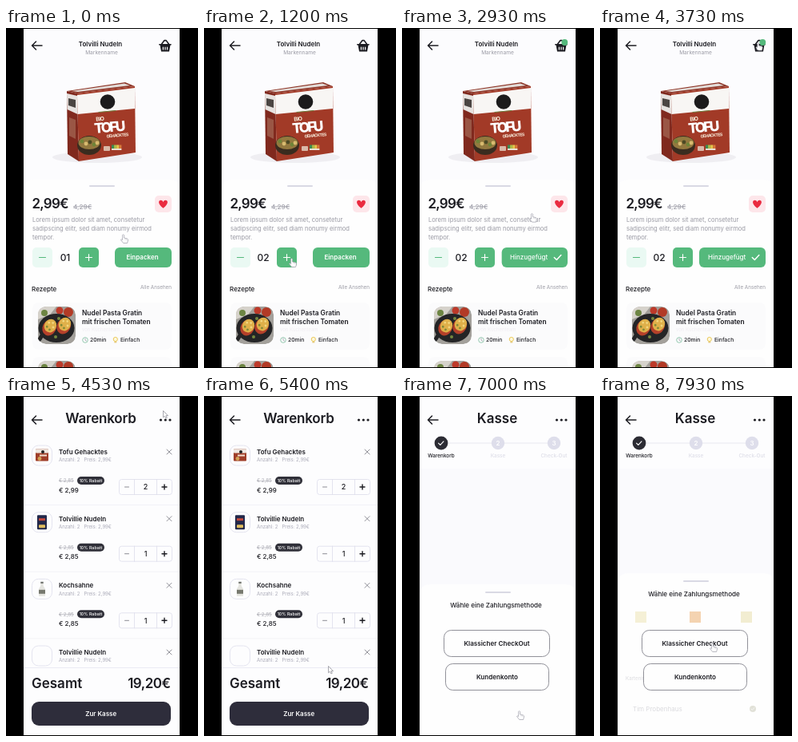
These frames come from a looping animation (240x426 px, 8 s). An HTML page:

```html
<!DOCTYPE html>
<html lang="de">
<head>
<meta charset="utf-8">
<title>Einkauf</title>
<style>
  html, body { margin: 0; width: 100%; height: 100%; overflow: hidden; background: #000; }
  svg { display: block; width: 100vw; height: 100vh; }
  text { font-family: Inter, "Open Sans", sans-serif; white-space: pre; }
</style>
</head>
<body>
<svg id="stage" viewBox="0 0 240 426"></svg>
<script>
const INK = '#1c1c22', GREY = '#9a9aa4', LILAC = '#dedeeb', GREEN = '#55b97c';

const text = (x, y, str, size, weight = 400, fill = INK, more = '') =>
  `<text x="${x}" y="${y}" font-size="${size}" font-weight="${weight}" fill="${fill}" ${more}>${str}</text>`;
const mid = (x, y, str, size, weight, fill, more = '') =>
  text(x, y, str, size, weight, fill, `text-anchor="middle" ${more}`);
const rect = (x, y, w, h, r, fill, more = '') =>
  `<rect x="${x}" y="${y}" width="${w}" height="${h}" rx="${r}" fill="${fill}" ${more}/>`;
const dot = (x, y, r, fill, more = '') => `<circle cx="${x}" cy="${y}" r="${r}" fill="${fill}" ${more}/>`;
const oval = (x, y, rx, ry, fill, more = '') =>
  `<ellipse cx="${x}" cy="${y}" rx="${rx}" ry="${ry}" fill="${fill}" ${more}/>`;
const line = (d, stroke = INK, w = 1, more = '') =>
  `<path d="${d}" fill="none" stroke="${stroke}" stroke-width="${w}" stroke-linecap="round" stroke-linejoin="round" ${more}/>`;
const shape = (d, fill, more = '') => `<path d="${d}" fill="${fill}" ${more}/>`;
const group = (id, content, more = '') => `<g id="${id}" ${more}>${content}</g>`;
const at = (x, y, content) => `<g transform="translate(${x} ${y})">${content}</g>`;

const page = fill => rect(22, 1, 195, 424, 0, fill);
const backArrow = y => line(`M45 ${y}H32.5M37.5 ${y - 5}L32.5 ${y}L37.5 ${y + 5}`, INK, 1.5);
const more = [193.5, 199.3, 205].map(x => dot(x, 30, 1.6, INK)).join('');
const check = (x, y, color, s = 1) =>
  line(`M${x - 4 * s} ${y}l${3 * s} ${3 * s}l${5.5 * s} ${-6 * s}`, color, 1.5 * s);
const handle = y => rect(104, y - 1, 32, 2, 1, '#d9d9e4');
const sheet = y => shape(`M22 446V${y + 14}Q22 ${y} 36 ${y}H204Q218 ${y} 218 ${y + 14}V446Z`, '#fefefe');

function packshot() {
  return oval(114, 162, 56, 7, '#e4e1e8', 'opacity=".5"')
    + shape('M76 79L149 68L161 73L89 82Z', '#8d3527')
    + shape('M82 79L148 69.5L155 72L90 80Z', '#e3dcd8')
    + shape('M76 79L89 82L91 167L77 158Z', '#80291e')
    + shape('M76 82L89 85L89.5 108L76.5 102Z', '#e6e2df')
    + shape('M78 88l9 2v10l-9 -3Z', '#4b4542')
    + shape('M79 112l8 3v24l-8 -4Z', '#9a5645')
    + shape('M89 82L161 73L162 156L91 167Z', '#a23a27')
    + shape('M89 84L161 75V101L89.5 108Z', '#f8f6f4')
    + dot(127, 92.5, 9.3, '#1c1b1c')
    + line('M116 105.5L137 103.5', '#6d7d3c', 1)
    + `<g transform="rotate(-5 127 123)">`
    + text(113, 115.5, 'BIO', 7, 700, '#f6ead9', 'letter-spacing="-.6"')
    + text(110, 130.5, 'TOFU', 17.5, 800, '#fff', 'letter-spacing="-2.8"')
    + text(124.5, 137.5, 'GEHACKTES', 5.4, 700, '#f6ead9', 'letter-spacing="-.7"') + '</g>'
    + oval(104, 147, 15, 12, '#3a2c1f') + oval(104, 144, 13.5, 8, '#93793f')
    + [95, 100, 105, 110, 114].map((x, i) =>
        dot(x, 142 + i * 3 % 5, 2.4, ['#6f8438', '#d8bb70', '#4c4a25'][i % 3])).join('')
    + rect(122, 148, 8, 6, 1, '#d9b8a8')
    + ['#3f8b52', '#a9bd49', '#e4c84c', '#d87838'].map((c, i) => rect(132 + i * 3.1, 146.5, 3.1, 4.5, 0, c)).join('')
    + rect(132, 151, 12.4, 2, 0, '#eadfd2');
}

function dish(y) {
  const half = (x, dy) => `<g transform="rotate(28 ${x} ${y + dy})">`
    + oval(x, y + dy + 1.5, 8.5, 10.5, '#b5402a') + oval(x, y + dy - 1, 7.5, 8.5, '#dfb04a')
    + [0, 1, 2, 3, 4].map(i => dot(x + 4 * Math.cos(i * 2.5), y + dy - 1 + 5 * Math.sin(i * 2.5), 1.4,
        i % 2 ? '#7e8a39' : '#f2d67e')).join('') + '</g>';
  return `<g clip-path="inset(0 round 10px)">` + rect(40, y, 47, 47, 10, '#a3a09b')
    + shape(`M40 ${y + 16}V${y + 10}q0 -10 10 -10h13l-8 10Z`, '#d6d2cb')
    + dot(48, y + 8, 4, '#6d8543') + dot(67, y + 5, 4.5, '#bd3a2a') + dot(78, y + 7, 6, '#b23a26')
    + oval(63, y + 27, 22.5, 18, '#242426') + line(`M45 ${y + 36}l-3 5`, '#242426', 5)
    + half(55, 25) + half(73, 23)
    + dot(62, y + 38, 2, '#74873e') + dot(66, y + 15, 2, '#74873e') + '</g>';
}

function basket() {
  return line('M191.8 20.8H206M194.6 20L198 15.6H200.2L203.4 20', INK, 1.6)
    + shape('M192.5 21H205.5L204 29.5H194Z', INK)
    + line('M196.4 24V27M199 24V27M201.6 24V27', '#fff', 1.2);
}

function productPage() {
  const heart = 'M0 5C-7.5 -.8 -6 -5 -2.9 -5Q-.8 -4.9 0 -2.8Q.8 -4.9 2.9 -5C6 -5 7.5 -.8 0 5Z';
  return page('#fcfcfe')
    + backArrow(22) + mid(118, 23, 'Tolvilli Nudeln', 8, 600, INK) + mid(119.5, 33.2, 'Markenname', 6.6, 400, GREY)
    + basket() + group('badge', dot(0, 0, 3.9, GREEN))
    + packshot() + sheet(190) + handle(198)
    + text(32.5, 226, '2,99€', 17, 600, INK, 'letter-spacing="-.75"')
    + text(84, 226.5, '4,29€', 8.2, 500, '#a3a3ad', 'text-decoration="line-through"')
    + rect(186, 210, 21, 21, 5, '#fde6ea') + at(196.5, 220.7, shape(heart, '#ea2b40'))
    + ['Lorem ipsum dolor sit amet, consetetur', 'sadipscing elitr, sed diam nonumy eirmod', 'tempor.']
        .map((s, i) => text(33, 242.7 + i * 11, s, 7.6, 400, GREY)).join('')
    + rect(33, 275, 25, 25, 5, '#eaf9f3') + line('M41.5 287.5H49.5', GREEN, 1.1)
    + rect(91, 275, 25, 25, 5, GREEN) + line('M99.5 287.5H107.5M103.5 283.5V291.5', '#fff', 1.1)
    + mid(74, 291.7, '01', 12, 500, INK, 'id="count"')
    + rect(136, 275, 71, 25, 6, GREEN, 'id="pack"')
    + group('packLabel', mid(170.5, 290.4, 'Einpacken', 8, 600, '#fff'))
    + group('doneLabel', text(135, 290.4, 'Hinzugefügt', 8, 500, '#fff'))
    + group('doneCheck', check(194.3, 287.5, '#fff'))
    + text(32, 330, 'Rezepte', 8.1, 500) + text(207, 327.2, 'Alle Ansehen', 6.3, 400, GREY, 'text-anchor="end"')
    + rect(33, 344, 174, 59, 8, '#fbfbfc') + dish(349)
    + text(95, 359.8, 'Nudel Pasta Gratin', 8.4, 600) + text(95, 370.8, 'mit frischen Tomaten', 8.4, 600)
    + text(95, 379.5, 'von Küchenteam', 6, 400, '#f0edf2')
    + dot(99, 391, 3.3, 'none', 'stroke="#7dbd9d" stroke-width=".8"') + line('M99 389V391.2L100.5 392', GREY, .7)
    + text(105, 393.3, '20min', 6.8, 500)
    + dot(136.8, 390, 2.6, '#fff8dc', 'stroke="#e7c34b" stroke-width=".9"') + line('M135.7 393.8H137.9', '#d9b347', 1)
    + text(143, 393.3, 'Einfach', 6.8, 500)
    + rect(33, 412, 174, 59, 8, '#fbfbfc') + dish(417);
}

function cartRow(y, name, price, count, icon) {
  return rect(32.5, y - 8, 25, 25, 8, '#fdfdfe', `stroke="${LILAC}" stroke-width=".8"`) + at(45, y + 4.5, icon)
    + text(66, y + 2.9, name, 8, 600)
    + text(66, y + 12.2, 'Anzahl: 2   Preis: 2,99€', 6, 400, '#aaaab7')
    + line(`M201 ${y - 3}l6 6m0 -6l-6 6`, '#85858e', .9)
    + text(66, y + 38.2, '€ 2,85', 6.2, 400, '#aaaab2', 'text-decoration="line-through"')
    + rect(89, y + 31, 34, 10, 5, '#303039') + mid(106, y + 38, '10% Rabatt', 5.3, 500, '#fff')
    + text(66, y + 50.5, `€ ${price}`, 8, 500)
    + rect(141.5, y + 34.5, 66, 19, 3, '#fdfdfe', `stroke="${LILAC}" stroke-width=".8"`)
    + line(`M160.5 ${y + 34.5}v19M188.5 ${y + 34.5}v19`, LILAC, .8)
    + line(`M148.5 ${y + 44}h5`, '#8c8c94', 1) + line(`M195 ${y + 44}h6m-3 -3v6`, INK, 1.4)
    + mid(174.5, y + 47.3, count, 9, 500, INK)
    + line(`M22 ${y + 66.5}H218`, '#f0f0f6', .8);
}

function cartPage() {
  const tofu = rect(-8, -8, 16, 15, 1, '#9f3e29') + rect(-8, -8, 16, 5, 1, '#eee9e2') + dot(1, -4.5, 2, '#222')
    + rect(-3, -1, 9, 2, 0, '#f3dfd0') + dot(-3, 4, 2.4, '#d2a256');
  const noodles = rect(-6, -9, 12, 18, 1, '#22284b') + rect(-4, -5, 8, 3, 0, '#c44a3d') + rect(-4, 3, 8, 4, 1, '#dfbd5f');
  const cream = shape('M-1.7 -9H1.7V-4L4 0V9H-4V0L-1.7 -4Z', '#e4e4df') + rect(-4, 1, 8, 5, 0, '#77796f') + rect(-1.7, -9, 3.4, 2, 0, '#686b66');
  return page('#fdfdfe') + backArrow(30) + mid(118.5, 34.3, 'Warenkorb', 17, 600, INK, 'letter-spacing="-.2"') + more
    + cartRow(70, 'Tofu Gehacktes', '2,99', 2, tofu)
    + cartRow(153.7, 'Tolvillie Nudeln', '2,85', 1, noodles)
    + cartRow(237.3, 'Kochsahne', '2,85', 1, cream)
    + cartRow(321, 'Tolvillie Nudeln', '2,85', 1, '')
    + rect(22, 340, 196, 86, 0, '#fdfdfe') + line('M22 340.5H218', '#e9e9f3', .9)
    + text(32, 366, 'Gesamt', 17, 600, INK)
    + text(205.5, 366, '19,20€', 17, 600, INK, 'text-anchor="end" letter-spacing="-.5"')
    + rect(32, 383, 174, 30, 9, '#2e2d3b') + mid(118.7, 401, 'Zur Kasse', 8, 600, '#fff');
}

function checkoutPage() {
  const step = (x, n, name) => dot(x, 59, 8.2, LILAC) + mid(x, 62, n, 8, 600, '#fff') + mid(x, 77, name, 6.4, 500, '#dedee8');
  const choice = (x, y, w, name) => rect(x, y, w, 33, 9, '#fefefe', 'stroke="#777780" stroke-width=".8"')
    + mid(x + w / 2, y + 19.8, name, 8.1, 600, INK);
  const mark = (x, fill) => rect(x, 270, 14, 14, 0, fill);
  return page('#fdfdfe') + rect(22, 91, 195, 334, 0, '#fafafd')
    + backArrow(30) + mid(119, 34.3, 'Kasse', 17, 600, INK) + more
    + line('M58 59H112M128 59H182', '#e6e6ee', .9)
    + dot(49, 59, 8.4, '#2c2c34') + check(48.6, 59.2, '#fff', .75) + mid(49, 77, 'Warenkorb', 6.4, 500, INK)
    + step(120, '2', 'Kasse') + step(190, '3', 'Check-Out')
    + group('sheet', sheet(236) + handle(246) + mid(117.5, 265, 'Wähle eine Zahlungsmethode', 8.1, 500, INK))
    + group('payment', mark(44, '#e8dc9c') + mark(112, '#e5943f') + mark(176, '#e0d48f')
      + text(32, 356, 'Karteninhaber', 6.2, 400, '#aaaab2')
      + text(41, 395, 'Tim Probenhaus', 8, 400, '#a5a5af')
      + dot(191, 392, 4, '#b7b7a0') + check(190.8, 392, '#fff', .45))
    + choice(52.5, 293.5, 132, 'Klassicher CheckOut') + choice(54.5, 335.5, 129, 'Kundenkonto');
}

const hand = shape('M-2.4 -4.6Q-1.3 -6 -.4 -4.5V-1L3.7 0Q4.7 .4 4.5 2L3.6 5.5H-1.3L-4.5 1.4Q-4.2 .1 -2.4 1.5Z', '#fff',
  'stroke="#9c9ca8" stroke-width=".7" stroke-linejoin="round"') + line('M1 -.5V1.2M2.7 0V1.5', '#b4b4bc', .5);
const arrow = shape('M-2.5 -4.5V3.8L-.5 2.1L.9 5L2.3 4.3L1 1.6H3.5Z', '#fff', 'stroke="#85858f" stroke-width=".7"');

document.getElementById('stage').innerHTML = '<clipPath id="screen"><path d="M22 1H217V425H22Z"/></clipPath>'
  + group('phone', group('product', productPage()) + group('cart', cartPage())
    + group('checkout', checkoutPage()) + group('cursor', group('hand', hand) + group('arrow', arrow)),
    'clip-path="url(#screen)"');

const ease = p => p * p * (3 - 2 * p);
const ramp = (t, a, b) => ease(Math.min(1, Math.max(0, (t - a) / (b - a))));
const el = id => document.getElementById(id);
const fade = (id, v) => el(id).setAttribute('opacity', v);
const move = (id, x, y, s = 1) => el(id).setAttribute('transform', `translate(${x} ${y}) scale(${s})`);

// time, x, y
const cursorPath = [
  [0, 148, 264], [700, 111, 294], [1250, 111, 294], [1600, 155, 292], [2700, 155, 292],
  [3500, 199, 23], [4600, 199, 23], [5400, 158, 343], [5750, 148, 400], [7050, 148, 400],
  [7650, 142, 315], [8000, 142, 315]
];
const clicks = [900, 1700, 3780, 5900, 7760];

function cursorAt(t) {
  const i = cursorPath.findIndex(k => k[0] > t);
  const [a, x, y] = cursorPath[i - 1], [b, nextX, nextY] = cursorPath[i];
  const p = ramp(t, a, b);
  return [x + (nextX - x) * p, y + (nextY - y) * p];
}

function render(t) {
  el('count').textContent = t < 900 ? '01' : '02';

  const shrink = ramp(t, 1720, 2020), grow = ramp(t, 2650, 2950);
  const width = 71 - 46 * shrink + 58 * grow;
  el('pack').setAttribute('x', 207 - width);
  el('pack').setAttribute('width', width);
  fade('packLabel', 1 - ramp(t, 1720, 1860));
  fade('doneCheck', ramp(t, 1860, 2020));
  fade('doneLabel', ramp(t, 2750, 2950));
  move('badge', 203.3, 18, ramp(t, 1800, 2050));

  fade('cart', ramp(t, 3860, 4160));
  fade('checkout', ramp(t, 5960, 6260));

  const open = ramp(t, 7770, 7940);
  move('sheet', 0, -14 * open);
  fade('payment', .4 * open);

  const press = Math.max(0, ...clicks.map(c => 1 - Math.abs(t - c) / 100));
  move('cursor', ...cursorAt(t), 1 - .15 * press);
  const pointing = !(t > 4160 && t < 5650) && !(t > 7200 && t < 7500);
  fade('hand', pointing ? 1 : 0);
  fade('arrow', pointing ? 0 : 1);
}

const start = performance.now();
function tick() {
  render((performance.now() - start) % 8000);
  requestAnimationFrame(tick);
}
render(0);
requestAnimationFrame(tick);
</script>
</body>
</html>
```
